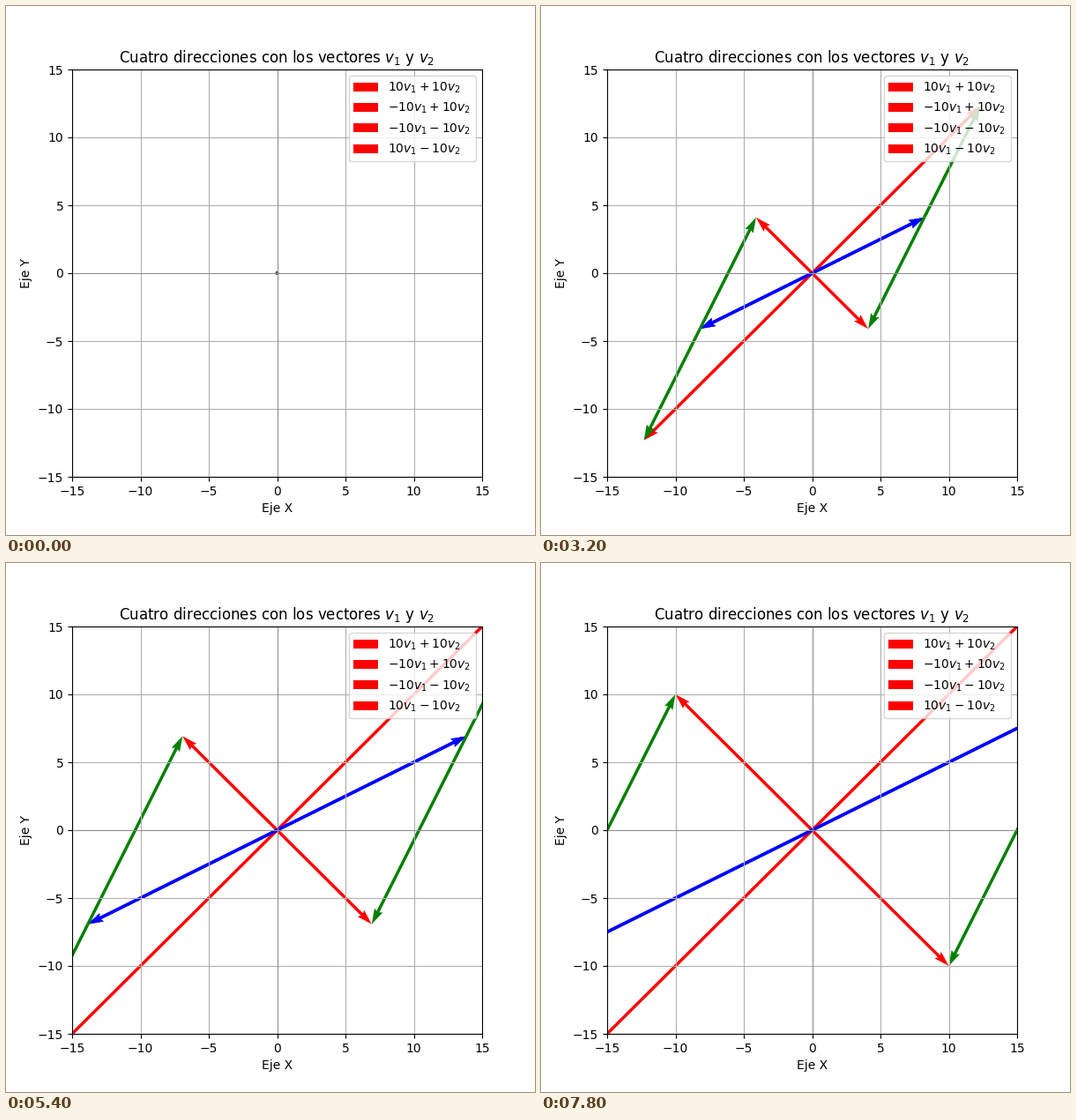
Animation of 600x600 px, one loop 8 s. Source, as a matplotlib script:

```python
import numpy as np
import matplotlib.pyplot as plt
from matplotlib.animation import FuncAnimation

FRAMES = 40
INTERVAL = 200
LIMIT = 15
REACH = 10

v1 = np.array([2, 1])
v2 = np.array([1, 2])
directions = [(1, 1), (-1, 1), (-1, -1), (1, -1)]
labels = ["$10v_1 + 10v_2$", "$-10v_1 + 10v_2$",
          "$-10v_1 - 10v_2$", "$10v_1 - 10v_2$"]

fig, ax = plt.subplots(figsize=(6, 6), dpi=100)
ax.set_xlim(-LIMIT, LIMIT)
ax.set_ylim(-LIMIT, LIMIT)
ax.axhline(0, color="gray", lw=0.5)
ax.axvline(0, color="gray", lw=0.5)
ax.grid(True)
ax.set_xlabel("Eje X")
ax.set_ylabel("Eje Y")
ax.set_title("Cuatro direcciones con los vectores $v_1$ y $v_2$")


def arrow(color, label=None):
    return ax.quiver(0, 0, 0, 0, angles="xy", scale_units="xy", scale=1,
                     color=color, label=label)


sums = [arrow("red", label) for label in labels]
firsts = [arrow("blue") for _ in directions]
seconds = [arrow("green") for _ in directions]
ax.legend(loc="upper right")


def update(frame):
    s = REACH * frame / (FRAMES - 1)
    for (a, b), total, first, second in zip(directions, sums, firsts, seconds):
        p, q = a * s * v1, b * s * v2
        total.set_UVC(*(p + q))
        first.set_UVC(*p)
        second.set_offsets([p])
        second.set_UVC(*q)
    return sums + firsts + seconds


anim = FuncAnimation(fig, update, frames=FRAMES, interval=INTERVAL,
                     repeat=True, repeat_delay=0, blit=False)
plt.show()
```
